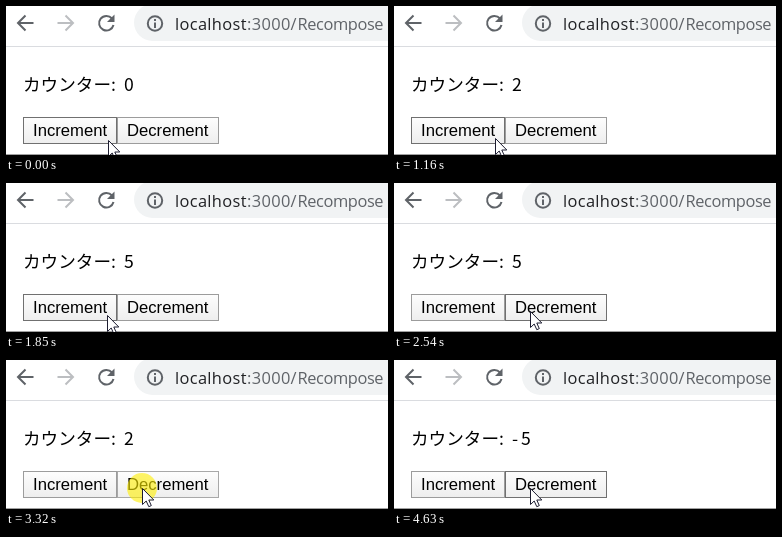
These frames come from a looping animation (382x149 px, 5180 ms). An HTML page:

```html
<!DOCTYPE html>
<html lang="ja">
<head>
<meta charset="utf-8">
<title>Counter</title>
<style>
  html, body { margin: 0; width: 100%; height: 100%; overflow: hidden; background: #fff; }
  svg { display: block; }
  .icon { fill: none; stroke: #5f6368; stroke-width: 2; }
  .icon.off { stroke: #bcbec1; }
  .url { font: 16.4px "Open Sans", "Noto Sans", sans-serif; fill: #5f6368; letter-spacing: -.4px; }
  .host, .port { letter-spacing: .35px; }
  .host { fill: #202124; }
  .page { font: 300 17.6px "Noto Sans CJK JP", "Noto Sans CJK", sans-serif; }
  #count { letter-spacing: 3px; }
  .label { font: 16.67px "Liberation Sans", Arial, sans-serif; }
  .button { fill: url(#face); stroke: #9c9c9c; }
  .button.hover { stroke: #707070; }
  .button.pressed { stroke: #a8a8a8; }
</style>
</head>
<body>
<svg width="382" height="149" viewBox="0 0 382 149">
  <defs>
    <linearGradient id="face" x1="0" y1="0" x2="0" y2="1">
      <stop offset="0" stop-color="#fdfdfd"/>
      <stop offset="1" stop-color="#eeeeee"/>
    </linearGradient>
  </defs>

  <!-- Browser bar -->
  <rect x="128" y="-2" width="300" height="37" rx="18.500" fill="#f1f3f4"/>
  <path class="icon" d="M27.500 17H12.500M19.500 9.500L12 17L19.500 24.500"/>
  <path class="icon off" d="M51.500 17H66.500M59.500 9.500L67 17L59.500 24.500"/>
  <g transform="translate(-1 0)">
    <path class="icon" d="M107 12.500A7.300 7.300 0 1 0 108.500 19"/>
    <path d="M109.500 8.500V16H102Z" fill="#5f6368"/>
  </g>
  <circle class="icon" cx="149" cy="17.500" r="7.200"/>
  <path class="icon" d="M149 13V15M149 16.500V22"/>
  <text class="url host" x="169" y="24">localhost</text>
  <text class="url port" x="241" y="24">:3000/</text>
  <text class="url" x="291.500" y="24">Recompose</text>
  <rect y="40" width="382" height="1" fill="#dadce0"/>

  <!-- Page -->
  <text class="page" x="17" y="85">カウンター:</text>
  <text class="page" id="count" x="118" y="85">0</text>
  <rect class="button" id="inc" x="17.500" y="111.500" width="93" height="26"/>
  <rect class="button" id="dec" x="111.500" y="111.500" width="101" height="26"/>
  <text class="label" x="27" y="130">Increment</text>
  <text class="label" x="121" y="130">Decrement</text>
  <rect y="148" width="382" height="1" fill="#a0a0a0"/>

  <g id="pointer">
    <circle id="glow" r="15" fill="#ffee00" fill-opacity=".6"/>
    <path d="M.5 .5V16.500L4.200 13L6.800 18.700L9.300 17.600L6.800 12H11.800Z"
          fill="#fff" stroke="#1c1c30" stroke-linejoin="round"/>
  </g>
</svg>
<script>
  const LOOP = 5180;
  const HOLD = 70;
  const NUDGE = 720;
  const GLIDE = { at: 2310, step: 76, steps: 4 };
  const REST = [101, 132];
  const GOAL = [136, 128];

  // Evenly spaced clicks; each changes the count when released
  const bursts = [
    { at: 1010, clicks: 2, gap: 80, add: 1 },
    { at: 1310, clicks: 2, gap: 150, add: 1 },
    { at: 1710, clicks: 1, gap: 0, add: 1 },
    { at: 2855, clicks: 5, gap: 155, add: -1 },
    { at: 3855, clicks: 5, gap: 155, add: -1 }
  ];
  const clicks = bursts.flatMap(({ at, clicks, gap, add }) =>
    Array.from({ length: clicks }, (_, i) => ({ press: at + i * gap, add })));

  const el = id => document.getElementById(id);
  const [count, inc, dec, pointer, glow] = ["count", "inc", "dec", "pointer", "glow"].map(el);

  function pointerAt(t) {
    if (t < NUDGE) return [102, 134];
    const done = Math.floor((t - GLIDE.at) / GLIDE.step) + 1;
    const p = Math.min(1, Math.max(0, done / GLIDE.steps));
    return REST.map((from, i) => Math.round(from + (GOAL[i] - from) * p));
  }

  function setButton(button, over, down) {
    button.classList.toggle("hover", over);
    button.classList.toggle("pressed", over && down);
  }

  function draw(now) {
    const t = now % LOOP;
    const [x, y] = pointerAt(t);
    const down = clicks.some(c => t >= c.press && t < c.press + HOLD);
    count.textContent = clicks.reduce((n, c) => t >= c.press + HOLD ? n + c.add : n, 0);
    pointer.setAttribute("transform", `translate(${x} ${y})`);
    glow.setAttribute("visibility", down ? "visible" : "hidden");
    setButton(inc, x < 111, down);
    setButton(dec, x >= 111, down);
  }

  const start = performance.now();
  function tick() {
    draw(performance.now() - start);
    requestAnimationFrame(tick);
  }
  tick();
</script>
</body>
</html>
```
